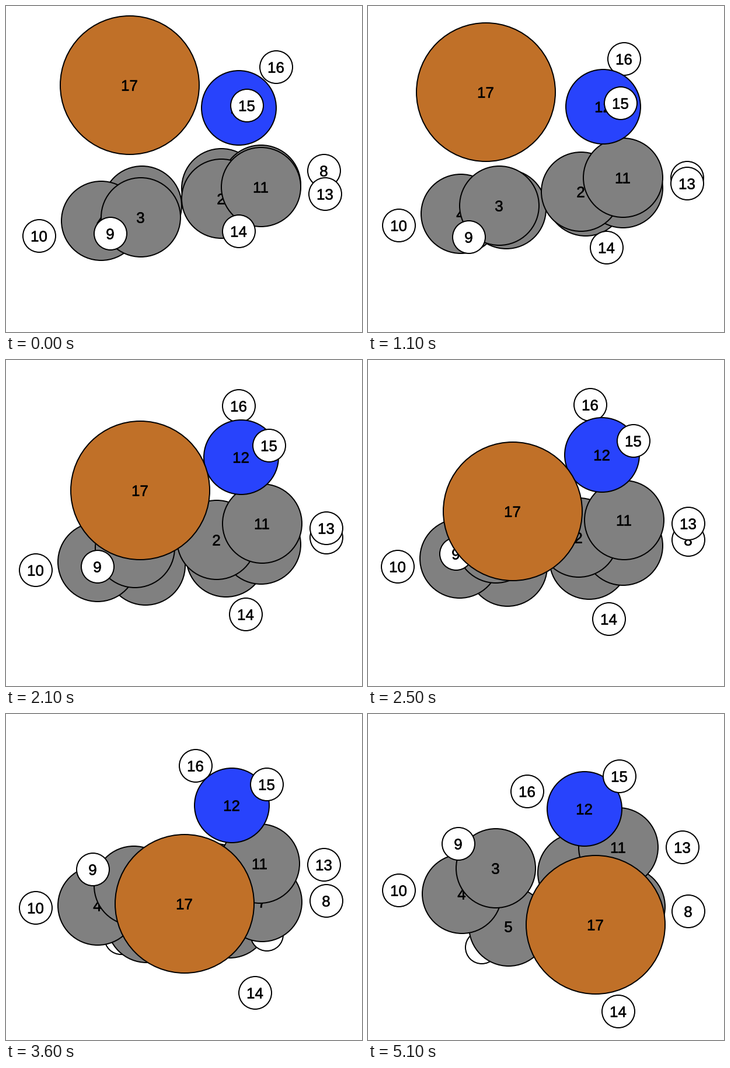
A matplotlib script for the animation above (5200 ms loop, 610 by 560 pixels).

```python
import numpy as np
import matplotlib.pyplot as plt
from matplotlib.animation import FuncAnimation
from matplotlib.patches import Circle
from matplotlib.patheffects import withStroke

W, H, DPI = 610, 560, 80
FRAMES, INTERVAL = 52, 100
PX = 72 / DPI  # points per pixel
STEP = 2       # balls move on a two-pixel grid

KINDS = {"small": (28, "white"), "ring": (68, "#808080"),
         "blue": (64, "#2843fc"), "big": (119, "#c07028")}

plt.rcParams["font.family"] = "Liberation Sans"
fig = plt.figure(figsize=(W / DPI, H / DPI), dpi=DPI, facecolor="white")
ax = fig.add_axes([0, 0, 1, 1])
ax.set_xlim(0, W)
ax.set_ylim(H, 0)
ax.axis("off")


def glide(points):
    """Smooth path through points evenly spaced over the loop."""
    p = np.array(points, float)
    slope = np.gradient(p, axis=0)
    s = np.linspace(0, len(p) - 1, FRAMES)
    i = np.minimum(s.astype(int), len(p) - 2)
    u = (s - i)[:, None]
    path = ((1 + 2 * u) * (1 - u) ** 2 * p[i] + u * (1 - u) ** 2 * slope[i]
            + u * u * (3 - 2 * u) * p[i + 1] + u * u * (u - 1) * slope[i + 1])
    return p[0] + STEP * np.round((path - p[0]) / STEP)


class Ball:
    def __init__(self, number, kind, *points):
        radius, color = KINDS[kind]
        self.path = glide(points)
        layer = len(ax.patches) + 1
        self.disc = ax.add_patch(Circle((0, 0), radius, fc=color, ec="black",
                                        lw=2 * PX, zorder=layer))
        self.label = ax.text(
            0, 0, str(number), fontsize=26 * PX, ha="center", va="baseline",
            zorder=layer + 0.5,
            path_effects=[withStroke(linewidth=0.5 * PX, foreground="black")])

    def move(self, frame):
        x, y = self.path[frame]
        self.disc.center = x, y
        self.label.set_position((x - 0.5, y + 9.5))


# Listed from back to front.
balls = [
    Ball(0, "small", (199, 355), (198, 375), (195, 401)),
    Ball(1, "ring", (369, 313), (379, 343), (387, 361)),
    Ball(6, "small", (437, 307), (443, 355), (451, 413)),
    Ball(7, "ring", (437, 307), (438, 319), (441, 331)),
    Ball(5, "ring", (233, 343), (240, 356), (241, 365)),
    Ball(4, "ring", (163, 369), (157, 341), (161, 309)),
    Ball(3, "ring", (231, 363), (219, 315), (219, 265)),
    Ball(2, "ring", (369, 331), (360, 304), (359, 273)),
    Ball(8, "small", (545, 283), (549, 310), (549, 339)),
    Ball(9, "small", (179, 391), (171, 393), (151, 330), (150, 256), (155, 223)),
    Ball(10, "small", (57, 395), (51, 354), (53, 303)),
    Ball(11, "ring", (437, 311), (438, 275), (429, 229)),
    Ball(16, "small", (463, 105), (433, 88), (379, 77), (314, 94), (273, 133)),
    Ball(12, "blue", (399, 175), (404, 173), (401, 163), (385, 157), (371, 163)),
    Ball(13, "small", (547, 323), (548, 280), (539, 229)),
    Ball(14, "small", (399, 387), (410, 420), (413, 446), (430, 486), (429, 511)),
    Ball(15, "small", (413, 171), (436, 165), (455, 138), (444, 118), (431, 107)),
    Ball(17, "big", (212, 136), (204, 156), (250, 264), (318, 336), (390, 362)),
]


def draw(frame):
    for ball in balls:
        ball.move(frame)
    return []


anim = FuncAnimation(fig, draw, frames=FRAMES, interval=INTERVAL,
                     repeat=True, repeat_delay=0, blit=False)
plt.show()
```
